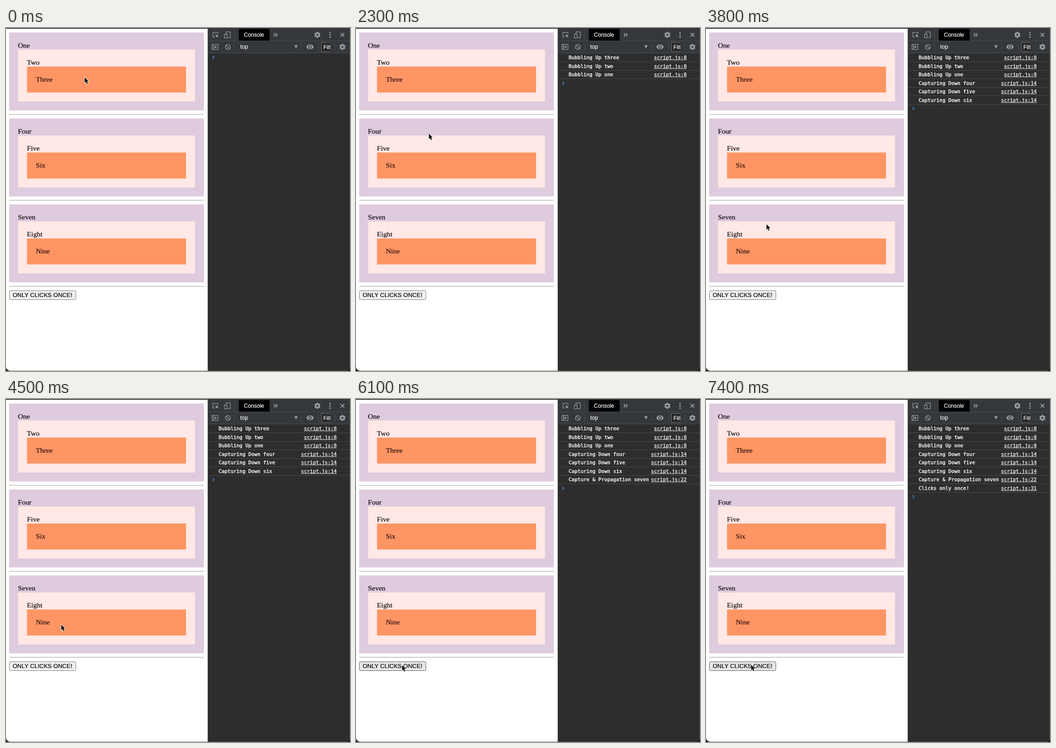
These frames come from a looping animation (749x747 px, 7.5 s). An HTML page with a canvas:

```html
<!DOCTYPE html>
<html lang="en">
<head>
<meta charset="utf-8">
<title>Event propagation</title>
<style>
html, body { margin: 0; width: 100%; height: 100%; overflow: hidden; background: #111; }
canvas { display: block; }
</style>
</head>
<body>
<canvas id="stage" width="749" height="747"></canvas>
<script>
const ctx = document.getElementById('stage').getContext('2d');
const LOOP = 7500, STEP = 100;
const PAD = 19.5, NEST = 37.1, GROUP = 187.2, ROW = 18.55;
const SERIF = '15.63px "Liberation Serif", "Times New Roman", serif';
const SANS = '"Liberation Sans", Arial, sans-serif';
const MONO = '10.75px "DejaVu Sans Mono", Menlo, monospace';
const ICON = '#9aa0a6', BRIGHT = '#b4b8bc', BAR = '#35383b', RULE = '#4b4e52';
const COLORS = ['#dfcbde', '#ffe8e5', '#ff9564'];

const groups = [['One', 'Two', 'Three'], ['Four', 'Five', 'Six'], ['Seven', 'Eight', 'Nine']];
const [bubble, capture, both] = groups.map(g => g.map(s => s.toLowerCase()));

const entry = (at, message, num) => ({ at, message, link: 'script.js:' + num });
const logs = [
  ...bubble.reverse().map(s => entry(1600, 'Bubbling Up ' + s, 8)),
  ...capture.map(s => entry(3000, 'Capturing Down ' + s, 14)),
  entry(4600, 'Capture & Propagation ' + both[0], 22),
  entry(6400, 'Clicks only once!', 31)
];

// pointer moves: each eases from the previous resting place
const home = { x: 171, y: 107 };
const moves = [
  { from: 800, to: 1500, x: 168, y: 108 },
  { from: 1900, to: 2600, x: 152, y: 308 },
  { from: 3200, to: 4200, x: 120, y: 491 },
  { from: 5000, to: 6050, x: 100, y: 579 },
  { from: 6500, to: 7400, x: 98, y: 578 }
];

function pointerAt(t) {
  let { x, y } = home;
  for (const m of moves) {
    const p = Math.min(1, Math.max(0, (t - m.from) / (m.to - m.from)));
    const k = p * p * (3 - 2 * p);
    if (p > 0) {
      x += (m.x - x) * k;
      y += (m.y - y) * k;
    }
  }
  return { x, y };
}

function rect(x, y, w, h, color) {
  ctx.fillStyle = color;
  ctx.fillRect(x, y, w, h);
}

function frame(x, y, w, h, color = ICON) {
  ctx.strokeStyle = color;
  ctx.lineWidth = 1.2;
  ctx.strokeRect(x, y, w, h);
}

// a thin outline gives the slightly heavy look of smoothed text
function text(s, x, y, font, color, weight = 0.2, align = 'left') {
  ctx.font = font;
  ctx.fillStyle = ctx.strokeStyle = color;
  ctx.lineWidth = weight;
  ctx.textAlign = align;
  ctx.fillText(s, x, y);
  ctx.strokeText(s, x, y);
}

function line(x1, y1, x2, y2, color = ICON, width = 1.4) {
  ctx.beginPath();
  ctx.moveTo(x1, y1);
  ctx.lineTo(x2, y2);
  ctx.strokeStyle = color;
  ctx.lineWidth = width;
  ctx.stroke();
}

function disc(x, y, r, color = ICON) {
  ctx.beginPath();
  ctx.arc(x, y, r, 0, Math.PI * 2);
  ctx.fillStyle = color;
  ctx.fill();
}

function chevron(x, y, r, color) {
  line(x, y - r, x + r, y, color);
  line(x + r, y, x, y + r, color);
}

function triangle(x, y, size, angle) {
  ctx.save();
  ctx.translate(x, y);
  ctx.rotate(angle);
  ctx.beginPath();
  ctx.moveTo(size, 0);
  ctx.lineTo(-size, size);
  ctx.lineTo(-size, -size);
  ctx.fillStyle = ICON;
  ctx.fill();
  ctx.restore();
}

function gear(x, y) {
  ctx.save();
  ctx.translate(x, y);
  for (let i = 0; i < 6; i++) {
    rect(-1.8, -6.6, 3.6, 4, ICON);
    ctx.rotate(Math.PI / 3);
  }
  disc(0, 0, 5);
  disc(0, 0, 2.2, BAR);
  ctx.restore();
}

function drawPage(hover) {
  ctx.fillStyle = '#fff';
  ctx.beginPath();
  ctx.roundRect(0, 1.5, 439.5, 745, [0, 0, 0, 9]);
  ctx.fill();
  groups.forEach((names, g) => {
    const top = g * GROUP;
    names.forEach((name, n) => {
      const inset = n * PAD;
      rect(6.8 + inset, 9.8 + top + n * NEST, 424.2 - 2 * inset, 169.8 - n * (NEST + PAD), COLORS[n]);
    });
    names.forEach((name, n) => {
      const y = Math.round(42.8 + top + n * NEST);
      text(name, 26 + n * PAD, y, SERIF, n === 2 ? '#2a0c0c' : '#0c060c');
    });
    rect(7, 187.5 + top, 424, 1, '#9a9a9a');
  });
  ctx.beginPath();
  ctx.roundRect(7.5, 572, 144.5, 19.5, 2.5);
  ctx.fillStyle = hover ? '#e8e6e9' : '#f0f0f0';
  ctx.fill();
  ctx.strokeStyle = hover ? '#58505a' : '#767676';
  ctx.lineWidth = 1;
  ctx.stroke();
  text('ONLY CLICKS ONCE!', 14.5, 586, '13px ' + SANS, '#000');
}

function drawTabs() {
  const y = 14.8;
  rect(507, 2, 67, 25.5, '#000');
  text('Console', 518, 18.5, '12px ' + SANS, '#fff');
  // element picker
  frame(450.5, 9.5, 11, 10);
  rect(455, 13.5, 9, 9, BAR);
  triangle(458, 16, 3, -Math.PI * 0.75);
  line(457, 15, 462, 20);
  // device toggle
  frame(479, 8.5, 9.5, 12.5);
  rect(474, 13, 9, 9, BAR);
  frame(475.5, 13.5, 6, 8);
  rect(497, 7, 1, 16, RULE);
  chevron(583, y, 3.5, BRIGHT);
  chevron(587.5, y, 3.5, BRIGHT);
  gear(678, y);
  for (const d of [-5, 0, 5]) disc(705.5, y + d, 1.5, BRIGHT);
  for (const d of [-4, 4]) line(728.5, y - d, 736.5, y + d, BRIGHT);
}

function drawFilterBar() {
  const y = 41.2;
  // sidebar toggle
  frame(448.5, y - 5.4, 13, 10.8);
  line(451.7, y - 5, 451.7, y + 5);
  triangle(457, y, 2.7, 0);
  // clear console
  disc(483, y, 6);
  disc(483, y, 4.6, BAR);
  line(479.3, y - 3.7, 486.7, y + 3.7);
  for (const x of [497, 643, 680, 716]) rect(x, 33, 1, 16, RULE);
  text('top', 510, 45, '12.3px ' + SANS, '#f1f1f1');
  triangle(631.5, y, 3.6, Math.PI / 2);
  // eye
  ctx.beginPath();
  ctx.ellipse(662, y, 7.6, 5.1, 0, 0, Math.PI * 2);
  ctx.fillStyle = ICON;
  ctx.fill();
  disc(662, y, 3.7, BAR);
  disc(662, y, 2.1);
  // filter field, cut off by the narrow panel
  ctx.save();
  ctx.beginPath();
  ctx.rect(686, 31, 20, 21);
  ctx.clip();
  rect(687, 32, 19, 19, '#242424');
  frame(687, 31.7, 30, 19.5, '#6a6d70');
  text('Filter', 691, 45.5, '12px ' + SANS, '#eee');
  ctx.restore();
  gear(732.5, y);
}

function drawConsole(t) {
  ctx.beginPath();
  ctx.roundRect(439.5, 1.5, 309, 745, [0, 0, 9, 0]);
  ctx.fillStyle = '#2d2d2d';
  ctx.fill();
  ctx.strokeStyle = '#505050';
  ctx.lineWidth = 1;
  ctx.stroke();
  rect(440, 2, 308, 52.5, BAR);
  rect(440, 27.5, 308, 1, RULE);
  rect(440, 54, 308, 1, RULE);
  drawTabs();
  drawFilterBar();

  const shown = logs.filter(log => log.at <= t);
  shown.forEach(({ message, link }, i) => {
    const y = Math.round(68 + i * ROW);
    text(message, 463, y, MONO, '#fff', 0.4);
    text(link, 720, y, MONO, '#f0e8f0', 0.4, 'right');
    const w = ctx.measureText(link).width;
    rect(720 - w, y + 1, w, 1, '#e0d8e0');
    rect(440, Math.round(73 + i * ROW), 308, 1, '#494949');
  });
  chevron(449.8, 64.3 + shown.length * ROW, 3.2, '#5294f5');
}

function drawPointer({ x, y }) {
  ctx.save();
  ctx.translate(x + 0.4, y + 0.8);
  ctx.scale(0.87, 0.87);
  ctx.beginPath();
  ctx.moveTo(0, 0);
  ctx.lineTo(0, 13.5);
  ctx.lineTo(3, 10.7);
  ctx.lineTo(5.4, 16);
  ctx.lineTo(7.7, 15);
  ctx.lineTo(5.4, 9.8);
  ctx.lineTo(9.6, 9.6);
  ctx.closePath();
  ctx.lineJoin = 'round';
  ctx.lineWidth = 1.9;
  ctx.strokeStyle = '#fff';
  ctx.stroke();
  ctx.fillStyle = '#000';
  ctx.fill();
  ctx.restore();
}

function draw(t) {
  const pointer = pointerAt(t);
  rect(0, 0, 749, 747, '#161616');
  drawPage(pointer.y >= 572);
  drawConsole(t);
  drawPointer(pointer);
}

const start = performance.now();
function tick() {
  const t = (performance.now() - start) % LOOP;
  draw(Math.floor(t / STEP) * STEP);
  requestAnimationFrame(tick);
}
tick();
</script>
</body>
</html>
```
